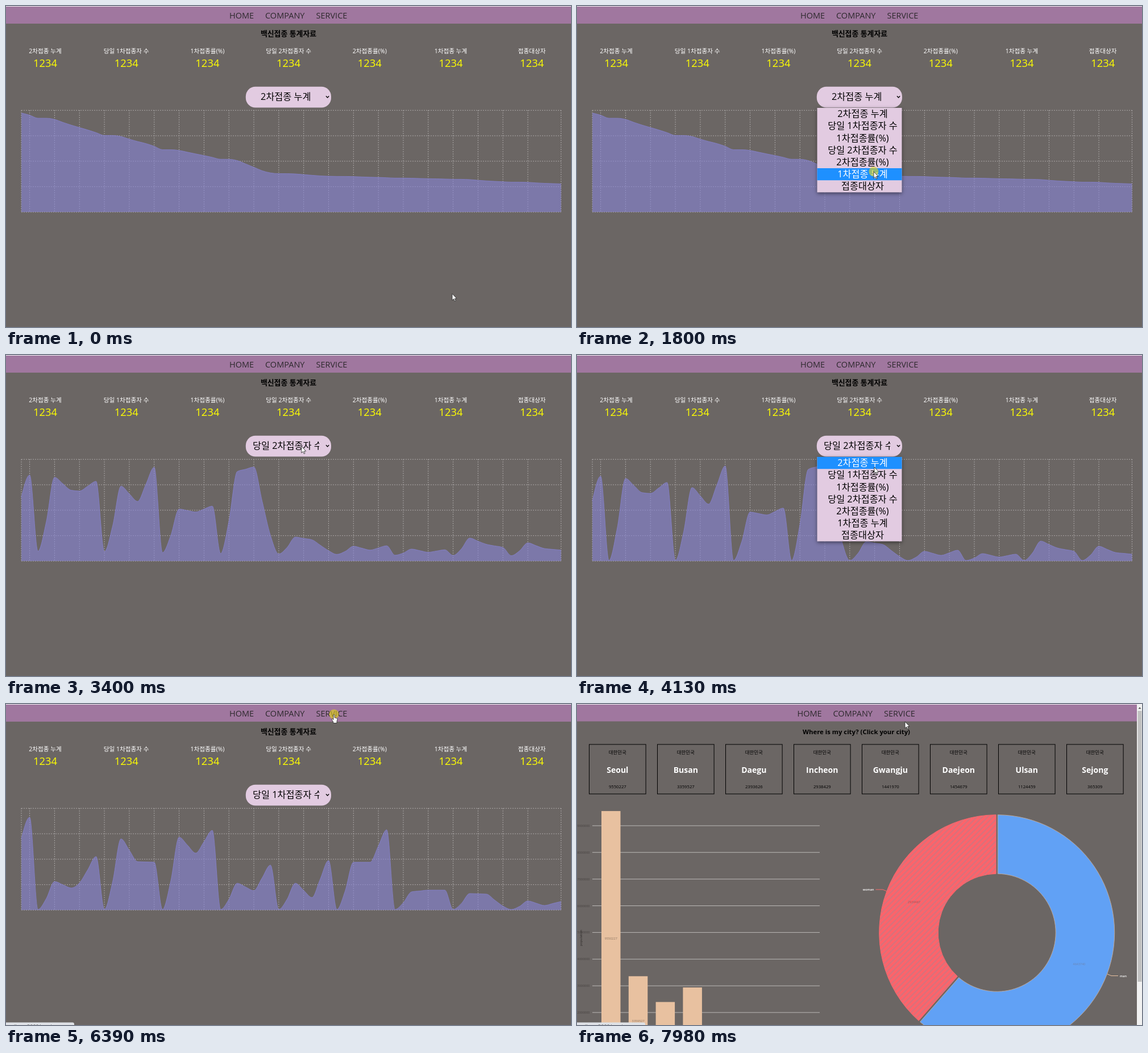
These frames come from a looping animation (994x564 px, 8000 ms). An HTML page:

```html
<!DOCTYPE html>
<html lang="ko">
<head>
<meta charset="utf-8">
<style>
  html, body { margin: 0; width: 100%; height: 100%; overflow: hidden; background: #6b6664; }
  svg { display: block; width: 994px; height: 564px; }
  text { font-family: "Open Sans", "Noto Sans CJK KR", "Noto Sans CJK JP", sans-serif; white-space: pre; }
  #menu > rect:first-child { filter: drop-shadow(0 2px 3px rgba(0, 0, 0, .5)); }
</style>
</head>
<body>
<svg viewBox="0 0 994 564">
  <defs>
    <pattern id="lines" width="6.7" height="6.7" patternUnits="userSpaceOnUse" patternTransform="rotate(45)">
      <rect width="6.7" height="6.7" fill="#ff636a"/><rect width="2.7" height="6.7" fill="#da707a"/>
    </pattern>
    <clipPath id="selectClip"><rect x="434" y="142" width="117" height="36"/></clipPath>
  </defs>
  <g id="stats">
    <g id="grid" stroke="#bab7b6" stroke-width=".8" stroke-dasharray="2 2"></g>
    <path id="area" fill="#8884d8" fill-opacity=".6"/>
    <path id="edge" fill="none" stroke="#8884d8" stroke-width=".7"/>
    <g id="tip">
      <path id="rule" stroke="#ccc" stroke-width=".9"/>
      <circle id="dot" r="2" fill="#8884d8" stroke="#fff" stroke-width="1.3"/>
      <g id="box">
        <rect id="frame" x=".5" y=".5" height="36" fill="#fff" stroke="#ccc" stroke-width=".7"/>
        <text id="date" x="5.5" y="14.5" font-size="7.5" fill="#333"/>
        <text id="value" x="5.5" y="27" font-size="7.5" fill="#8884d8"/>
      </g>
    </g>
    <rect x="421.8" y="141.7" width="150.2" height="36.8" rx="17" fill="#e2cbe1"/>
    <g clip-path="url(#selectClip)"><text id="chosen" y="164.5" font-size="16.3"/></g>
    <path d="M563 158.3l2.6 2.6l2.6-2.6" fill="none" stroke="#000" stroke-width="1.4"/>
    <g id="menu"></g>
  </g>
  <g id="city">
    <g id="cards"></g>
    <g id="bars"></g>
    <g id="pie"></g>
    <rect x="985" width="9" height="564" fill="#f1f1f1"/>
    <rect x="986.5" y="12" width="7" height="476" fill="#c1c1c1"/>
    <path d="M987.5 8.5l2.5-3l2.5 3z" fill="#505050"/>
  </g>
  <rect id="bar" y="1" fill="#a0779f"/>
  <rect width="994" height="1" fill="#f4f2f4"/>
  <g id="nav" fill="#2e2a2e" font-size="14.5"></g>
  <g id="status">
    <path d="M0 559.5H117q3 0 3 3V564H0z" fill="#dee1e6"/>
    <text x="-3" y="569.5" font-size="9" fill="#666">localhost:3000/service</text>
  </g>
  <circle id="click" r="8.5" fill="#e6d714" fill-opacity=".6"/>
  <path id="arrow" d="M0 0V11.6L2.7 9.1L4.4 13.1L6.2 12.3L4.5 8.5H8Z" fill="#fff" stroke="#222" stroke-width=".8"/>
  <path id="hand" d="M-1 1.2Q0 -.4 1.2 1.2V6L5 7Q6.3 7.5 6 9L5 13V15.5H-1.2V13.5L-4 9.3Q-3.8 7.6-2.4 8.2L-1 9.6Z" fill="#fff" stroke="#222" stroke-width=".8"/>
</svg>
<script>
const $ = id => document.getElementById(id);
const LEFT = 27, TOP = 183, BASE = 362, STEP = 14.608, LAST = 65, RIGHT = LEFT + LAST * STEP;
const LOOP = 8000, PRESS = 120, RELEASE = 70, LINK_CLICK = 6330, PAGE_CHANGE = 6560;

function add(parent, tag, attrs, content) {
  const el = document.createElementNS('http://www.w3.org/2000/svg', tag);
  set(el, attrs);
  if (content !== undefined) el.textContent = content;
  return parent.appendChild(el);
}
const label = (parent, x, y, size, content, attrs) =>
  add(parent, 'text', { x, y, 'font-size': size, 'text-anchor': 'middle', ...attrs }, content);
function set(el, attrs) { for (const k in attrs) el.setAttribute(k, attrs[k]); }
const show = (el, on) => { el.style.display = on ? '' : 'none'; };
const range = (n, fn) => Array.from({ length: n }, (_, i) => fn(i));
const clamp = v => Math.max(0, Math.min(1, v));
const mix = (a, b, k) => a + (b - a) * k;
const smooth = k => k * k * (3 - 2 * k);
const easeOut = k => 1 - (1 - clamp(k)) ** 3;

// Each week has a day near zero, a rise, then runs through its start, middle and end heights.
function daily(weeks) {
  return weeks.flatMap(([a, b, c], w) => {
    const days = w === 1 ? 8 : 7;
    return range(days, d => {
      if (d < 2) return BASE - (d ? a * .4 : 1);
      const u = 2 * (d - 2) / (days - 3);
      return BASE - (u < 1 ? mix(a, b, u) : mix(b, c, u - 1));
    });
  }).slice(5);
}

// The newest day comes first, so a running total falls by each day's count.
function total(days, from, to) {
  const sums = [0];
  for (let i = 0; i < LAST; i++) sums.push(sums[i] + BASE - days[i]);
  return sums.map(s => mix(from, to, s / sums[LAST]));
}

const firstDaily = daily([[40, 87, 163], [50, 36, 94], [125, 85, 84], [128, 100, 140], [47, 34, 79],
  [47, 22, 87], [84, 84, 141], [32, 35, 35], [29, 28, 7], [16, 8, 15]]);
const secondDaily = daily([[20, 61, 149], [145, 114, 138], [129, 100, 167], [86, 81, 93], [161, 170, 37],
  [34, 29, 8], [17, 10, 19], [13, 7, 12], [35, 23, 17], [26, 15, 12]]);

const options = ['2차접종 누계', '당일 1차접종자 수', '1차접종률(%)', '당일 2차접종자 수', '2차접종률(%)', '1차접종 누계', '접종대상자'];

// Each view is reached by opening the menu and picking an option.
const views = [
  { open: -LOOP, pick: -LOOP, ys: total(secondDaily, 188, 312.5), option: 0, key: 'sec_acc', unit: 111732 },
  { open: 940, pick: 1800, ys: total(firstDaily, 188.5, 277.3), option: 5, key: 'fir_acc', unit: 178771 },
  { open: 2540, pick: 2880, ys: secondDaily, option: 3, key: 'sec_inc1', unit: 3352 },
  { open: 3540, pick: 4570, ys: firstDaily, option: 1, key: 'fir_inc1', unit: 899.33 },
];
const clicks = [...views.flatMap(v => [v.open, v.pick]), LINK_CLICK];

// Cursor stops: arrival time, position, departure time.
const stops = [[0, 785, 505.5, 70], [300, 823, 335, 300], [740, 525, 152, 940], [1530, 522, 291, 1880],
  [2500, 504, 160, 2600], [2800, 512, 250, 2950], [3450, 520, 158, 3600], [3900, 526, 235, 3900],
  [4130, 523, 197, 4130], [4330, 522, 212, 4640], [5000, 524, 201, 5430], [6230, 577, 18, 7720], [7970, 577, 31, LOOP]];

function cursorAt(t) {
  const i = stops.findIndex(s => s[3] >= t), [arrive, x, y] = stops[i];
  if (t >= arrive) return [x, y];
  const [, x0, y0, leave] = stops[i - 1], k = smooth((t - leave) / (arrive - leave));
  return [mix(x0, x, k), mix(y0, y, k)];
}

// Monotone cubic through evenly spaced points.
function curve(ys) {
  const m = [];
  for (let i = 1; i < LAST; i++) {
    const a = ys[i] - ys[i - 1], b = ys[i + 1] - ys[i];
    m[i] = (Math.sign(a) + Math.sign(b)) * Math.min(Math.abs(a), Math.abs(b), Math.abs(a + b) / 4);
  }
  m[0] = (3 * (ys[1] - ys[0]) - m[1]) / 2;
  m[LAST] = (3 * (ys[LAST] - ys[LAST - 1]) - m[LAST - 1]) / 2;
  let d = `M${LEFT} ${ys[0]}`;
  for (let i = 1; i <= LAST; i++) {
    const x = LEFT + i * STEP;
    d += `C${x - STEP * 2 / 3} ${ys[i - 1] + m[i - 1] / 3} ${x - STEP / 3} ${ys[i] - m[i] / 3} ${x} ${ys[i]}`;
  }
  return d;
}

// Statistics page
label($('stats'), 497, 53.2, 12.9, '백신접종 통계자료', { 'font-weight': 700 });
options.forEach((o, i) => {
  const x = 69 + i * 142.7;
  label($('stats'), x, 82.5, 10.6, o, { fill: '#fff' });
  label($('stats'), x, 106.5, 18.4, '1234', { fill: '#ff0' });
});
range(5, k => add($('grid'), 'path', { d: `M${LEFT} ${183.3 + k * 44.7}H${RIGHT}` }));
[0, ...range(21, k => 1 + 3 * k), LAST].forEach(i =>
  add($('grid'), 'path', { d: `M${LEFT + i * STEP} ${TOP}V${BASE}` }));
$('stats').appendChild($('menu'));
const MENU_TOP = 179, ROW = 21.2;
add($('menu'), 'rect', { x: 422.5, y: MENU_TOP, width: 149, height: 7 * ROW, fill: '#e2cbe1' });
const hover = add($('menu'), 'rect', { x: 422.5, width: 149, height: ROW, fill: '#1e90ff' });
const rows = options.map((o, i) => label($('menu'), 502.5, MENU_TOP + 16.2 + i * ROW, 16.3, o));
const navItems = ['HOME', 'COMPANY', 'SERVICE'].map(s => add($('nav'), 'text', { y: 22.3 }, s));

// City page
const cities = Object.entries({ Seoul: 9550227, Busan: 3359527, Daegu: 2393626, Incheon: 2938429,
  Gwangju: 1441970, Daejeon: 1454679, Ulsan: 1124459, Sejong: 365309 });
label($('cards'), 491.5, 52.8, 11.35, 'Where is my city? (Click your city)', { 'font-weight': 700 });
cities.forEach(([name, people], i) => {
  const x = 71.3 + i * 120;
  add($('cards'), 'rect', { x: x - 49.8, y: 71, width: 99.6, height: 87, fill: 'none', stroke: '#000' });
  label($('cards'), x, 88, 8.5, '대한민국');
  label($('cards'), x, 120.6, 14, name, { fill: '#fff', 'font-weight': 700 });
  label($('cards'), x, 148.3, 7.7, people);
});
const ZERO = 635.8, MILLION = 46.88;
for (let k = 2; k < 10; k++) {
  const y = ZERO - k * MILLION;
  add($('bars'), 'path', { d: `M27 ${y}H427`, stroke: '#bbb8b6' });
  label($('bars'), 22.5, y + 2, 5.5, k + '000000', { 'text-anchor': 'end', fill: '#464240' });
}
label($('bars'), 0, 0, 5.6, 'population', { transform: 'translate(9 411) rotate(-90)', fill: '#2c2928' });
const columns = cities.slice(0, 4).map(([, people], i) => {
  const x = 43 + i * 47.8;
  return {
    height: people / 1e6 * MILLION,
    rect: add($('bars'), 'rect', { x, width: 33.5, fill: '#e8c1a0' }),
    text: label($('bars'), x + 16.8, 0, 5.5, people, { fill: '#8b7460' }),
  };
});

const CX = 738.7, CY = 401.7, INNER = 103.5, OUTER = 207, TURN = 2 * Math.PI, SPLIT = TURN * 221.2 / 360;
const polar = (a, r) => `${CX + r * Math.sin(a)} ${CY - r * Math.cos(a)}`;
function sector(a, b, r) {
  const gap = 1.6, big = b - a > Math.PI ? 1 : 0;
  return `M${polar(a + gap / r, r)}A${r} ${r} 0 ${big} 1 ${polar(b - gap / r, r)}` +
    `L${polar(b - gap / INNER, INNER)}A${INNER} ${INNER} 0 ${big} 0 ${polar(a + gap / INNER, INNER)}Z`;
}
const man = add($('pie'), 'path', { fill: '#61a1f5', stroke: '#c5ad9c', 'stroke-width': .9, 'stroke-linejoin': 'round' });
const woman = add($('pie'), 'path', { fill: 'url(#lines)', stroke: '#fb686c', 'stroke-width': 1, 'stroke-linejoin': 'round' });
const notes = add($('pie'), 'g', {});
label(notes, 883.5, 459, 5.5, '4643740', { fill: '#6b86b4' });
label(notes, 593, 349.5, 5.5, '2939487', { fill: '#a94d50' });
add(notes, 'path', { d: 'M545 329L538 326H525.5', fill: 'none', stroke: '#f76b6b' });
add(notes, 'path', { d: 'M933 474.5L940 477.5H952', fill: 'none', stroke: '#e8c1a0' });
label(notes, 522.5, 328, 5.5, 'woman', { fill: '#fff', 'text-anchor': 'end', 'font-weight': 600 });
label(notes, 955, 480, 5.5, 'man', { fill: '#fff', 'text-anchor': 'start', 'font-weight': 600 });

function drawStats(t, x, y) {
  const now = t - RELEASE;
  const n = views.filter(v => v.pick <= now).length - 1, view = views[n], prev = views[Math.max(0, n - 1)];
  const k = smooth(clamp((now - view.pick) / 560));
  const ys = view.ys.map((v, i) => mix(prev.ys[i], v, k)), line = curve(ys);
  set($('edge'), { d: line });
  set($('area'), { d: `${line}V${BASE}H${LEFT}Z` });

  const name = options[view.option], long = name.length > 9;
  $('chosen').textContent = name;
  set($('chosen'), { x: long ? 434 : 492.3, 'text-anchor': long ? 'start' : 'middle' });

  const open = views.some(v => now >= v.open && now < v.pick);
  show($('menu'), open);
  const row = y < MENU_TOP ? view.option : Math.min(6, Math.floor((y - MENU_TOP) / ROW));
  set(hover, { y: MENU_TOP + row * ROW });
  rows.forEach((r, i) => set(r, { fill: i === row ? '#fff' : '#000' }));

  const inside = !open && x > LEFT && x < RIGHT && y > TOP && y < BASE;
  show($('tip'), inside);
  if (!inside) return;
  const i = Math.round((x - LEFT) / STEP), px = LEFT + i * STEP;
  set($('rule'), { d: `M${px} ${TOP}V${BASE}` });
  set($('dot'), { cx: px, cy: ys[i] });
  set($('box'), { transform: `translate(${px + 5} ${Math.min(y + 15.7, BASE - 37)})` });
  $('date').textContent = new Date(Date.UTC(2021, 8, 7 - i)).toISOString().slice(0, 10).replace(/-/g, '.');
  $('value').textContent = `${view.key} : ${Math.round((BASE - view.ys[i]) * view.unit)}`;
  set($('frame'), { width: $('value').getComputedTextLength() + 10.5 });
}

function drawCity(t) {
  const grow = easeOut((t - PAGE_CHANGE) / 690), open = easeOut((t - PAGE_CHANGE) / 540);
  for (const { height, rect, text } of columns) {
    const h = height * grow;
    set(rect, { y: ZERO - h, height: h });
    set(text, { y: ZERO - h / 2 + 2 });
  }
  const r = mix(INNER + 1, OUTER, open);
  set(man, { d: sector(0, SPLIT, r) });
  set(woman, { d: sector(SPLIT, TURN, r) });
  set(notes, { opacity: open });
}

function draw(t) {
  const [x, y] = cursorAt(t), onCity = t >= PAGE_CHANGE;
  show($('stats'), !onCity);
  show($('city'), onCity);
  if (onCity) drawCity(t); else drawStats(t, x, y);

  set($('bar'), { width: onCity ? 985 : 994, height: onCity ? 29.5 : 30 });
  [393, 456, 545.5].forEach((nx, i) => set(navItems[i], { x: nx - (onCity ? 5.5 : 0) }));
  show($('status'), t >= 6230);

  const pointing = y < 30, move = { transform: `translate(${x} ${y})` };
  show($('hand'), pointing);
  show($('arrow'), !pointing);
  show($('click'), clicks.some(c => t >= c && t < c + PRESS));
  for (const id of ['hand', 'arrow', 'click']) set($(id), move);
}

const start = performance.now();
function tick() {
  draw((performance.now() - start) % LOOP);
  requestAnimationFrame(tick);
}
tick();
</script>
</body>
</html>
```
